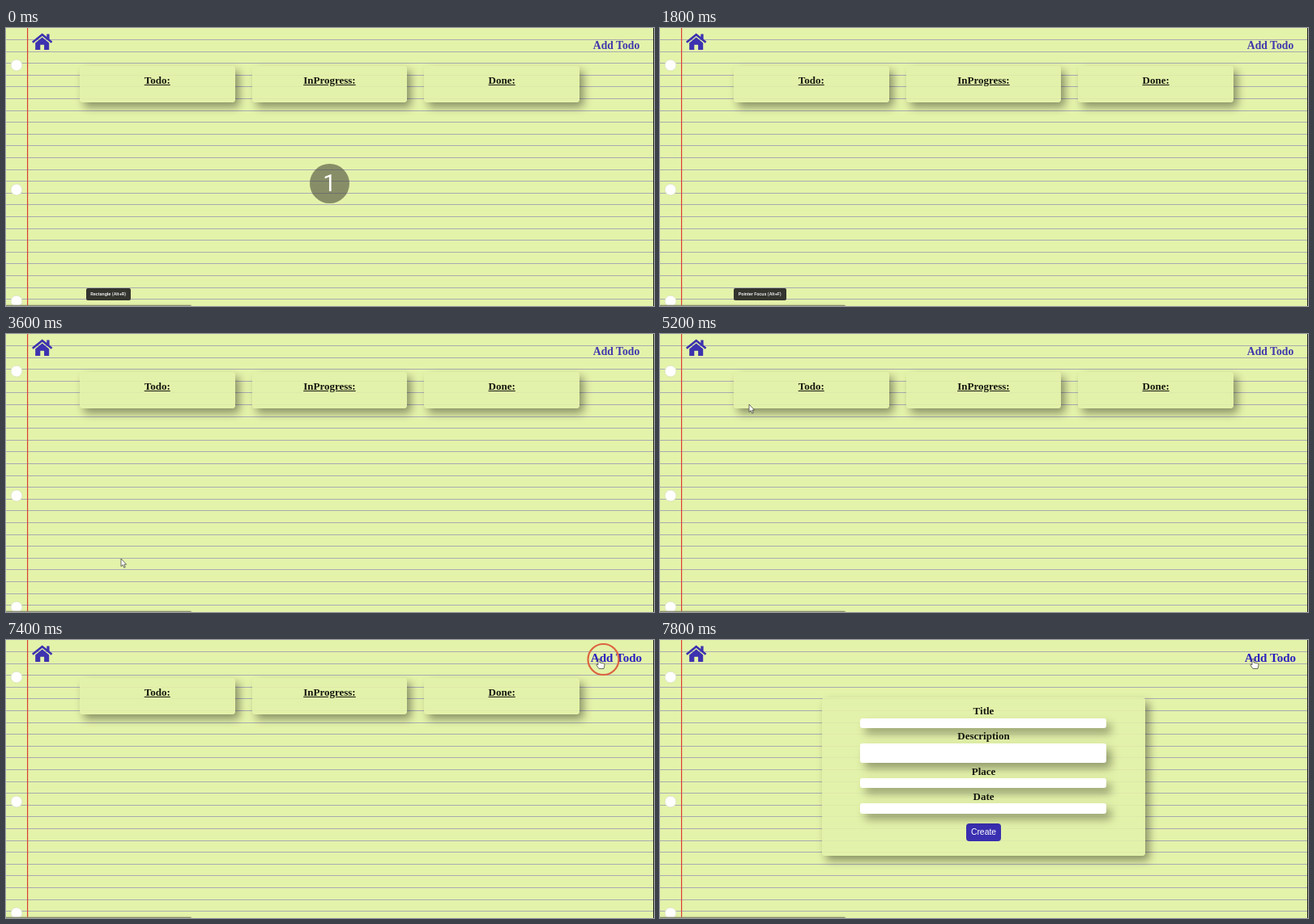
An HTML page that plays this animation: 800 px wide and 344 px high, repeating every 8 s.

```html
<!DOCTYPE html>
<html lang="en">
<head>
<meta charset="utf-8">
<title>Todo board</title>
<style>
  html, body { margin: 0; width: 100%; height: 100%; overflow: hidden; }
  body { position: relative; background: #e4f3aa; }
  svg { position: absolute; left: 0; top: 0; }
  div { position: absolute; box-sizing: border-box; }
  .card, .label, #add { font: bold 13px/16px "Liberation Serif", serif; text-align: center; color: #15170f; }
  .card { background: rgba(228, 243, 170, .87); border-radius: 4px; box-shadow: 5px 6px 11px rgba(0, 0, 0, .4); }
  .card u { position: absolute; left: 0; right: 0; top: 10px; }
  .label { left: 0; width: 399px; }
  .field { left: 47px; width: 304px; background: #fff; border-radius: 3px; box-shadow: 6px 7px 11px rgba(0, 0, 0, .35); }
  #button { left: 178px; top: 155.5px; width: 43px; height: 22px; border-radius: 4px; background: #3a2fb0;
    color: #fff; font: 10.4px/22px "Liberation Sans", sans-serif; text-align: center; }
  #add { left: 703px; top: 14px; width: 101px; font-size: 13.7px; color: #3e36ad; }
  #add.hover { font-size: 15.1px; color: #2a20c0; }
  #tip { top: 322px; height: 15px; border-radius: 2px; background: #33352e; color: #fff;
    font: 500 5.6px/15px Roboto, sans-serif; text-align: center; white-space: nowrap; }
  #status { left: 0; top: 342.5px; width: 229px; height: 4px; border-radius: 0 2px 0 0; background: #85896c; box-shadow: 0 0 2px #85896c; }
  #count { left: 375px; top: 167.5px; width: 49px; height: 49px; border-radius: 50%; background: rgba(65, 68, 53, .57);
    color: #fff; font: 29px/49px Roboto, sans-serif; text-align: center; }
</style>
</head>
<body>
<svg id="paper" width="800" height="344">
  <g id="rules" fill="#a7abb0"></g>
  <rect x="26" width="1.2" height="344" fill="#d9412f"/>
  <g fill="#fff" stroke="#d3deb0" stroke-width=".7">
    <circle cx="13" cy="46" r="7"/><circle cx="13" cy="200" r="7"/><circle cx="13" cy="338" r="7"/>
  </g>
  <g fill="#3d32b0">
    <path d="M32.8 17.8L44.7 8.2L56.6 17.8" fill="none" stroke="#3d32b0" stroke-width="2.6"/>
    <path d="M50.3 7.6h3.3v7l-3.3-2.6zM36.2 18.4L44.7 11.6L53.2 18.4V27H47.1V20.8H42.3V27H36.2z"/>
  </g>
  <rect x="799" width="1" height="344" fill="#20231b"/>
</svg>

<div id="board"></div>
<div id="form" class="card" style="left:200px;top:71px;width:399px;height:196px">
  <div id="button">Create</div>
</div>
<div id="add">Add Todo</div>
<div id="status"></div>
<div id="tip"></div>
<div id="count">1</div>

<svg width="800" height="344">
  <circle id="ring" cx="737.5" cy="24" r="19" fill="none" stroke="#dc6440" stroke-width="2.2"/>
  <g fill="#fff" stroke="#45483c" stroke-width=".8" stroke-linejoin="round">
    <path id="arrow" d="M0 0V9.6L2.2 7.6L3.8 11.2L5.3 10.5L3.8 7.1H6.6z"/>
    <path id="hand" d="M-1 1Q0-.6 1 1V5L6 6Q7.2 6.4 7 8L6 12.5H0L-3.2 8Q-3.2 6.4-1 7.6z"/>
  </g>
</svg>

<script>
const $ = id => document.getElementById(id);
const show = (id, on) => $(id).style.display = on ? "" : "none";

function box(parent, cls, style, html = "") {
  const el = document.createElement("div");
  el.className = cls;
  el.style.cssText = style;
  el.innerHTML = html;
  parent.append(el);
}

for (let y = 14; y < 344; y += 14.6)
  $("rules").innerHTML += `<rect x="0" y="${Math.round(y)}" width="799" height="1"/>`;

["Todo:", "InProgress:", "Done:"].forEach((name, i) =>
  box($("board"), "card", `left:${91 + i * 212.7}px;top:47px;width:191.5px;height:45px`, `<u>${name}</u>`));

// name, label top, field top, field height
[["Title", 8.5, 25.5, 12], ["Description", 39.5, 56.5, 24.5], ["Place", 83.5, 99.5, 12.5], ["Date", 114.5, 131, 12.5]]
  .forEach(([name, labelTop, fieldTop, height]) => {
    box($("form"), "field", `top:${fieldTop}px;height:${height}px`);
    box($("form"), "label", `top:${labelTop}px`, name);
  });

// time, x, y of the pointer
const path = [[2400, 100, 298], [3000, 132, 284], [3400, 142, 278], [4600, 142, 278], [4800, 142, 253],
  [5200, 110, 87], [5600, 300, 48], [6000, 700, 28], [6200, 732, 23], [8000, 732, 23]];

function pointerAt(t) {
  const i = Math.max(1, path.findIndex(p => p[0] >= t));
  const [t0, x0, y0] = path[i - 1], [t1, x1, y1] = path[i];
  const k = (t - t0) / (t1 - t0);
  return [x0 + (x1 - x0) * k, y0 + (y1 - y0) * k];
}

function setTip(text, left, width) {
  $("tip").textContent = text;
  $("tip").style.left = left + "px";
  $("tip").style.width = width + "px";
}

function draw(now) {
  const t = Math.floor(now % 8000 / 200) * 200;
  const hover = t >= 6200, formOpen = t >= 7600;
  show("count", t < 400);
  show("tip", t < 2200);
  if (t < 1400) setTip("Rectangle (Alt+R)", 98.5, 55.5);
  else setTip("Pointer Focus (Alt+F)", 91, 64.5);
  show("board", !formOpen);
  show("form", formOpen);
  show("ring", t === 7400);
  $("add").className = hover ? "hover" : "";
  show("arrow", t >= 2400 && !hover);
  show("hand", hover);
  if (t >= 2400)
    $(hover ? "hand" : "arrow").setAttribute("transform", `translate(${pointerAt(t)})`);
  requestAnimationFrame(draw);
}
draw(0);
</script>
</body>
</html>
```
